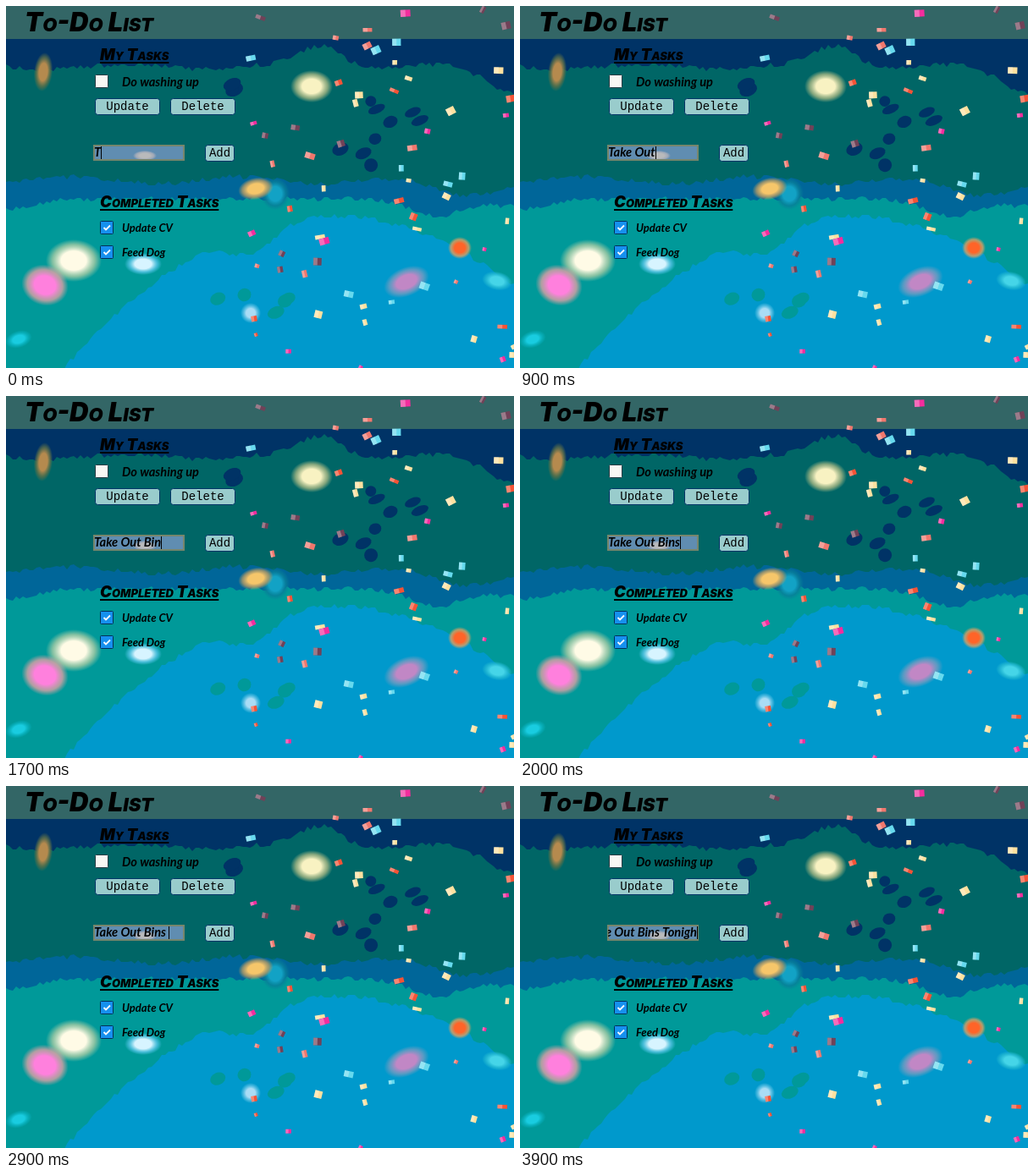
An HTML page with a canvas for the animation above (4 s loop, 600 by 428 pixels).

```html
<!DOCTYPE html>
<html lang="en">
<head>
<meta charset="utf-8">
<title>To-Do List</title>
<style>
html, body { margin: 0; width: 600px; height: 428px; overflow: hidden; background: #006666; }
canvas { display: block; }
</style>
</head>
<body>
<canvas id="stage" width="600" height="428"></canvas>
<script>
const W = 600, H = 428, LOOP = 4000, TAU = Math.PI * 2;
const stage = document.getElementById('stage').getContext('2d');
const backdrop = document.createElement('canvas');
backdrop.width = W;
backdrop.height = H;
let g = backdrop.getContext('2d');

const NAVY = '#003366', PINE = '#006666', BLUE = '#006699', TEAL = '#009999', SKY = '#0099cc';
const SCRIPT = 'italic 700 14.6px Lato, sans-serif';
const SMALL_SCRIPT = 'italic 700 13px Lato, sans-serif';
const HEADING = 'italic small-caps 900 18.6px Inter, sans-serif';
const TITLE = 'italic small-caps 900 31px Inter, sans-serif';
const MONO = '14px "Liberation Mono", monospace';

let seed = 17;
const random = () => (seed = (seed * 16807) % 2147483647) / 2147483647;
const between = (low, high) => low + (high - low) * random();
const bump = (x, center, width) => Math.exp(-(((x - center) / width) ** 2));

function text(str, x, y, font, align = 'left') {
  g.font = font;
  g.textAlign = align;
  g.fillStyle = '#000';
  g.fillText(str, x, y);
}

// Fills everything below the ragged line y = edge(x).
function below(color, edge) {
  g.fillStyle = color;
  g.beginPath();
  g.moveTo(0, H);
  for (let x = 0; x <= W; x += 4) g.lineTo(x, Math.round(edge(x) + between(-3, 3)));
  g.lineTo(W, H);
  g.fill();
}

function water() {
  g.fillStyle = NAVY;
  g.fillRect(0, 0, W, H);
  below(PINE, x => 72 + 3 * Math.sin(x / 30) - 24 * bump(x, 372, 36) + 28 * bump(x, W, 45));
  below(BLUE, x => 206 + 4 * Math.sin(x / 32 - 4) + 17 * bump(x, 535, 50));
  below(TEAL, x => 228 + 12 * bump(x, 0, 40) + 20 * bump(x, 510, 45) + 8 * bump(x, W, 40));
  below(SKY, x => 248 + 0.0018 * Math.max(0, 385 - x) ** 2 + 0.0018 * Math.max(0, x - 385) ** 2
    + 28 * bump(x, 290, 40));
}

function ovals(count, color, cx, cy, spreadX, spreadY) {
  g.fillStyle = color;
  for (let i = 0; i < count; i++) {
    const x = cx + between(-spreadX, spreadX), y = cy + between(-spreadY, spreadY);
    g.beginPath();
    g.ellipse(x, y, between(6, 11), between(5, 8), -0.4, 0, TAU);
    g.fill();
  }
}

function glow(x, y, rx, ry, core, rim, angle = 0) {
  g.save();
  g.translate(x, y);
  g.rotate(angle);
  g.scale(rx, ry);
  const fill = g.createRadialGradient(0, 0, 0, 0, 0, 1);
  fill.addColorStop(0, core);
  fill.addColorStop(0.45, core);
  fill.addColorStop(0.75, rim + 'cc');
  fill.addColorStop(1, rim + '00');
  g.fillStyle = fill;
  g.fillRect(-1, -1, 2, 2);
  g.restore();
}

function lights() {
  glow(44, 78, 11, 23, '#b58a4e', '#5f7048', 0.1);
  glow(361, 95, 25, 19, '#f8f2c2', '#a9b884');
  glow(80, 301, 33, 25, '#fffbe6', '#a9cca5');
  glow(46, 330, 28, 24, '#ff80dd', '#dca0a4', 0.3);
  glow(162, 305, 22, 13, '#d7f4ff', '#55c4e6');
  glow(318, 222, 17, 19, '#12a2c5', '#087e99');
  glow(295, 216, 21, 13, '#f6c66a', '#b79b64', -0.2);
  glow(473, 326, 28, 17, '#c187c5', '#729bc1', -0.4);
  glow(536, 286, 14, 13, '#ff6428', '#dc9f62');
  glow(580, 325, 18, 11, '#45d5e8', '#23b9d3', 0.2);
  glow(289, 363, 12, 12, '#a9dcf5', '#55bde2');
  glow(15, 394, 16, 10, '#19cce0', '#08b0bc', -0.3);
  glow(164, 177, 14, 6, '#ffe680', '#e6cc80');
}

// Scatters pieces evenly down the stage, denser towards the right.
function confetti(count) {
  const colors = ['#f32d9d', '#ffe1a0', '#f45336', '#ffe1a0', '#66d9ee', '#f0776d', '#704258'];
  for (let i = 0; i < count; i++) {
    const x = W * (1 - 0.54 * random() ** 1.2);
    const y = H * ((i * 0.618 + 0.02) % 1);
    const w = between(4, 12), h = between(4, 9);
    g.save();
    g.translate(x, y);
    g.rotate(between(-0.5, 0.5));
    g.fillStyle = colors[i % colors.length];
    g.fillRect(-w / 2, -h / 2, w, h);
    g.fillStyle = 'rgba(255, 255, 255, 0.3)';
    g.fillRect(-w / 2, -h / 2, w / 2, h);
    g.restore();
  }
}

function box(x, y, w, h, fill, stroke, radius = 0) {
  g.beginPath();
  g.roundRect(x + 0.5, y + 0.5, w - 1, h - 1, radius);
  g.fillStyle = fill;
  g.fill();
  g.strokeStyle = stroke;
  g.lineWidth = 1;
  g.stroke();
}

function button(label, x, y, w) {
  box(x, y, w, 20, '#99cccc', NAVY, 3);
  text(label, x + w / 2, y + 14, MONO, 'center');
}

function heading(label, y) {
  text(label, 111, y, HEADING);
  g.fillRect(111, y + 2, g.measureText(label).width, 2);
}

function doneTask(label, y) {
  box(111, y, 16, 16, '#1690ee', '#003057', 1);
  g.strokeStyle = '#fff';
  g.lineWidth = 1.8;
  g.beginPath();
  g.moveTo(115.5, y + 8);
  g.lineTo(118, y + 10.5);
  g.lineTo(123, y + 5.5);
  g.stroke();
  text(label, 137, y + 13, SMALL_SCRIPT);
}

function page() {
  text('To-Do List', 22, 30, TITLE);
  heading('My Tasks', 64);
  box(105, 81, 16, 16, '#f8f8f4', '#263b43', 1);
  text('Do washing up', 137, 95, SCRIPT);
  button('Update', 105, 109, 77);
  button('Delete', 194, 109, 77);
  button('Add', 235, 164, 35);

  g.fillStyle = 'rgba(148, 164, 218, 0.65)';
  g.fillRect(104, 164, 107, 19);
  g.strokeStyle = '#77866c';
  g.lineWidth = 2;
  g.strokeRect(104, 165, 106, 17);

  heading('Completed Tasks', 238);
  doneTask('Update CV', 254);
  doneTask('Feed Dog', 283);
}

// Each burst of keys has its own start and pace, in ms.
const BURSTS = [
  { keys: 'Take O', start: 0, pace: 100 },
  { keys: 'ut Bins', start: 700, pace: 200 },
  { keys: ' ', start: 2500, pace: 100 },
  { keys: 'Tonigh', start: 3000, pace: 150 },
];

function typedAt(time) {
  let typed = '', lastKey = 0;
  for (const { keys, start, pace } of BURSTS) {
    if (time < start) break;
    const count = Math.min(keys.length, Math.floor((time - start) / pace) + 1);
    typed += keys.slice(0, count);
    lastKey = start + (count - 1) * pace;
  }
  return { typed, lastKey };
}

function entry(time) {
  const { typed, lastKey } = typedAt(time);
  g.save();
  g.beginPath();
  g.rect(104, 164, 106, 18);
  g.clip();
  g.font = SCRIPT;
  const width = g.measureText(typed).width;
  const left = 104 - Math.max(0, width - 105);
  text(typed, left, 178, SCRIPT);
  if ((time - lastKey) % 1000 < 500) g.fillRect(Math.round(left + width), 166, 1, 15);
  g.restore();
}

water();
ovals(9, NAVY, 440, 120, 50, 75);
ovals(3, NAVY, 265, 96, 5, 4);
ovals(5, TEAL, 295, 350, 60, 18);
g.fillStyle = '#336666';
g.fillRect(0, 0, W, 39);
lights();
confetti(64);
page();
g = stage;

function frame(now) {
  const time = Math.floor((now % LOOP) / 100) * 100;
  g.drawImage(backdrop, 0, 0);
  entry(time);
  requestAnimationFrame(frame);
}
frame(0);
</script>
</body>
</html>
```
